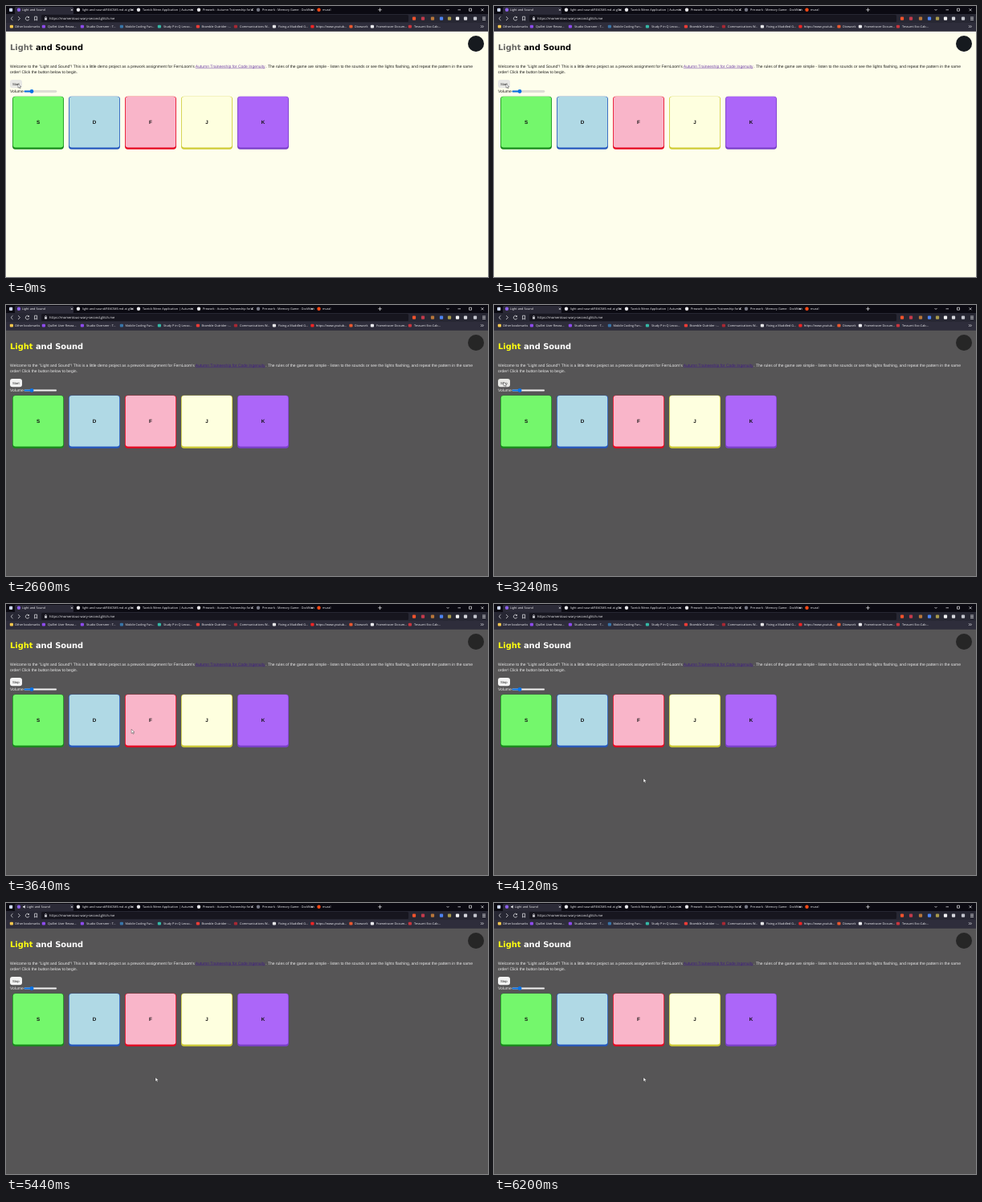
Write an HTML page that moves like this. It is 600 px wide and 338 px high and loops after 6320 ms.

```html
<!DOCTYPE html>
<html lang="en">
<head>
<meta charset="utf-8">
<title>Light and Sound</title>
<style>
  html, body { margin: 0; width: 100%; height: 100%; overflow: hidden; }
  svg {
    display: block; width: 100vw; height: 100vh; text-rendering: geometricPrecision;
    --page: #fefeec; --ink: #000; --light: #666663; --link: #6430a0;
    --badge: #161a1f; --track: #deded8; --button: #efefec;
  }
  svg.dark {
    --page: #565556; --ink: #fff; --light: #ffff10; --link: #3d1789;
    --badge: #262626; --track: #f1f1f1; --button: #f3f3f3;
  }
  .page { fill: var(--page); }
  .ui { font: 3.8px "Open Sans", sans-serif; fill: #f4f4f7; }
  .url { font-size: 4.1px; }
  .heading { font: bold 9.88px "DejaVu Sans", sans-serif; fill: var(--ink); }
  .heading tspan { fill: var(--light); }
  .copy { font: 5px "Liberation Sans", Arial, sans-serif; fill: var(--ink); fill-opacity: .88; }
  .copy .link { fill: var(--link); text-decoration: underline; text-decoration-thickness: .3px; }
  .button { font: 4.17px "Liberation Sans", Arial, sans-serif; fill: #222; }
  .letter { font: bold 6.25px "Liberation Sans", Arial, sans-serif; fill: #111; text-anchor: middle; }
  .line { fill: none; stroke: #ededf1; stroke-width: .7; }
</style>
</head>
<body>
<svg id="stage" viewBox="0 0 600 338" preserveAspectRatio="none"></svg>
<script>
const LOOP = 6320;
const DARK_AT = 2600, STARTED_AT = 3120, AUDIO_AT = 4420;

const text = (x, y, content, cls = 'ui', extra = '') =>
  `<text x="${x}" y="${y}" class="${cls}" ${extra}>${content}</text>`;
const rect = (x, y, w, h, fill, r = 0, extra = '') =>
  `<rect x="${x}" y="${y}" width="${w}" height="${h}" rx="${r}" fill="${fill}" ${extra}/>`;
const dot = (x, y, r, fill, extra = '') =>
  `<circle cx="${x}" cy="${y}" r="${r}" fill="${fill}" ${extra}/>`;
const line = d => `<path class="line" d="${d}"/>`;
const cross = (x, y, s = 1.1) => line(`M${x - s} ${y - s}l${2 * s} ${2 * s}m0 ${-2 * s}l${-2 * s} ${2 * s}`);

// [icon x, text x, label, icon colour]
const tabs = [
  [90, 95, 'light-and-sound/README.md at glitc', '#e8e8ec'],
  [165, 170, 'Tavrick Wenn Application | Autumn', '#e8e8ec'],
  [240, 245, 'Prework - Autumn Traineeship for C', '#e8e8ec'],
  [314, 319, 'Pre-work - Memory Game - DocWren', '#777986'],
  [389.5, 394, 'mural', '#ff4a16'],
];
const bookmarks = [
  [7, 11, 'Other bookmarks', '#f3c64e'],
  [47, 52, 'Quillet User Resea...', '#8d4bee'],
  [95, 100, 'Studio Overseer - T...', '#8d4bee'],
  [144, 148.5, 'Mobile Coding Fun...', '#3975a8'],
  [191, 196, 'Study P in Q Lesso...', '#35b8a6'],
  [239, 243.5, 'Bramble Outrider -...', '#ee3c36'],
  [286, 291, 'Communications W...', '#a82833'],
  [334, 339, 'Fixing a Muddled G...', '#e5e5e7'],
  [381.5, 386, 'https://www.youtub...', '#f02525'],
  [429.5, 434, 'Dicework', '#e9582f'],
  [456, 461, 'Frametracer Docum...', '#ececef'],
  [503, 508, 'Tessumi Eco-Cab...', '#c9363f'],
];
const extensions = [
  [508, '#f0532c'], [519, '#c33a4b'], [531, '#b8763a'], [542, '#4d83f2'],
  [552, '#a89a4c'], [562, '#f0f0f2'], [572, '#d5d6dc'], [584, '#c3c5cd'],
];
// [letter, face, edge]
const keys = [
  ['S', '#74f76c', '#178a1a'],
  ['D', '#b0d9e5', '#2457bd'],
  ['F', '#f9b5c9', '#e6061f'],
  ['J', '#feffdf', '#cfcc36'],
  ['K', '#ac66f9', '#7a3fca'],
];

const browser = () =>
  rect(0, 0, 600, 10, '#0b0a12') + rect(11, 1, 73, 9.5, '#2b2a37', 1.5) +
  rect(0, 10, 600, 11, '#272733') + rect(0, 21, 600, 10.8, '#2e2d3b') +
  rect(44, 11, 457, 9, '#17161f', 1.5) +
  rect(4, 2.7, 4.2, 4.2, '#c9d3ea', 1) + dot(16, 4.8, 2.2, '#8c62ea') +
  text(20, 6.2, 'Light and Sound', 'ui', 'id="tabTitle"') + cross(82, 4.8) +
  '<path id="speaker" d="M21.2 4h1l1.5-1.2v4l-1.5-1.2h-1z" fill="#f4f4f7"/>' +
  tabs.map(([ix, tx, label, color], i) =>
    dot(ix, 4.8, 2.2, color) + text(tx, 6.2, label) + (i < 4 ? cross(157 + i * 74.6, 4.8) : '')).join('') +
  line('M463.2 4.8h4.6m-2.3-2.3v4.6M548.5 4l1.5 1.5 1.5-1.5M562.5 4.8h3.5M576.5 3.2h3v3h-3z') + cross(593, 4.8, 1.5) +
  line('M8.5 13.2l-2.5 2.4 2.5 2.4M15 13.2l2.5 2.4-2.5 2.4M28.4 14.2a2.3 2.3 0 1 0 .4 2.2m-.3-3.2v1.3h-1.4M35.6 13.2h3v4.8l-1.5-1.3-1.5 1.3z') +
  rect(48, 15, 3, 2.5, '#d0d0d6', .4) + line('M48.7 15v-.7a.8 .8 0 0 1 1.6 0v.7') +
  text(54, 17.1, 'https://momentous-wary-second.glitch.me', 'ui url') +
  extensions.map(([x, color]) => rect(x - 2.1, 13.5, 4.2, 4.2, color, 1)).join('') +
  line('M593 14h4m-4 1.7h4m-4 1.7h4M591 24.2l1.4 1.4-1.4 1.4m2-2.8l1.4 1.4-1.4 1.4') +
  bookmarks.map(([ix, tx, label, color]) => rect(ix - 2.2, 23.7, 4.2, 3.8, color, 1) + text(tx, 27, label)).join('');

const key = ([letter, face, edge], i) => {
  const x = 8 + i * 70;
  return rect(x, 112.8, 64, 65.9, edge, 3.6) +
    rect(x + .8, 113, 62.4, 63.4, face, 3.2, `id="key${letter}"`) +
    text(x + 32, 146.9, letter, 'letter');
};

const stage = document.getElementById('stage');
stage.innerHTML =
  '<rect width="600" height="338" class="page"/>' + browser() +
  text(5, 55, '<tspan>Light</tspan> and Sound', 'heading') +
  dot(585, 47, 10, 'var(--badge)') +
  text(5, 76.6, 'Welcome to the "Light and Sound"! This is a little demo project as a prework assignment for FernLoom\'s', 'copy') +
  `<g class="copy">${text(235.8, 76.6, 'Autumn Traineeship for Code Ingenuity', 'link')}</g>` +
  text(323.2, 76.6, '. The rules of the game are simple - listen to the sounds or see the lights flashing, and repeat the pattern in the same', 'copy') +
  text(5, 84.2, 'order! Click the button below to begin.', 'copy') +
  rect(5, 92, 15, 10.2, 'var(--button)', 3, 'id="button"') +
  text(8, 98.6, 'Start', 'button', 'id="buttonLabel"') +
  text(5, 108.2, 'Volume', 'copy') +
  rect(22.5, 105.5, 40.5, 2, 'var(--track)', 1, 'stroke="#aaa" stroke-width=".25"') +
  rect(22.5, 105.5, 10, 2, '#0b72e4', 1) + dot(32, 106.5, 2.4, '#0b72e4') +
  keys.map(key).join('') +
  '<path id="cursor" d="M0 0v5.2l1.3-1.1 .9 1.9 .9-.4-.9-1.8h1.7z" fill="#fff" stroke="#222" stroke-width=".4"/>';

const el = id => document.getElementById(id);
const [tabTitle, speaker, button, buttonLabel, keyJ, cursor] =
  ['tabTitle', 'speaker', 'button', 'buttonLabel', 'keyJ', 'cursor'].map(el);

const ramp = (t, start, length) => Math.min(1, Math.max(0, (t - start) / length));

// [time, x, y]
const path = [
  [0, 15, 97], [2000, 15, 97], [2400, 20, 54], [2640, 20, 54], [3000, 12, 96],
  [3280, 12, 96], [3640, 156, 156], [3880, 182, 202], [4120, 186, 217.5], [LOOP, 186, 217.5],
];
function cursorAt(t) {
  const i = path.findIndex(point => point[0] > t);
  const [t0, x0, y0] = path[i - 1], [t1, x1, y1] = path[i];
  const p = (t - t0) / (t1 - t0);
  return [x0 + (x1 - x0) * p, y0 + (y1 - y0) * p];
}

function draw(t) {
  const dark = t >= DARK_AT, audio = t >= AUDIO_AT;
  stage.classList.toggle('dark', dark);

  const [x, y] = cursorAt(t);
  cursor.setAttribute('transform', `translate(${x} ${y})`);
  cursor.style.opacity = t >= 2400 && t < 2640 ? 0 : 1;

  const hovered = x < 20 && y > 92 && y < 102;
  button.style.fill = hovered ? '#e8e8e5' : '';
  buttonLabel.textContent = t < STARTED_AT ? 'Start' : 'Stop';

  tabTitle.setAttribute('x', audio ? 26 : 20);
  speaker.style.opacity = ramp(t, 4640, 300);

  const lit = ramp(t, 4340, 160) - ramp(t, 5280, 160);
  keyJ.style.fill = `rgb(254 255 ${223 - 213 * lit})`;
  keyJ.setAttribute('height', 63.4 + lit);
}

function tick() {
  draw(performance.now() % LOOP);
  requestAnimationFrame(tick);
}
tick();
</script>
</body>
</html>
```
